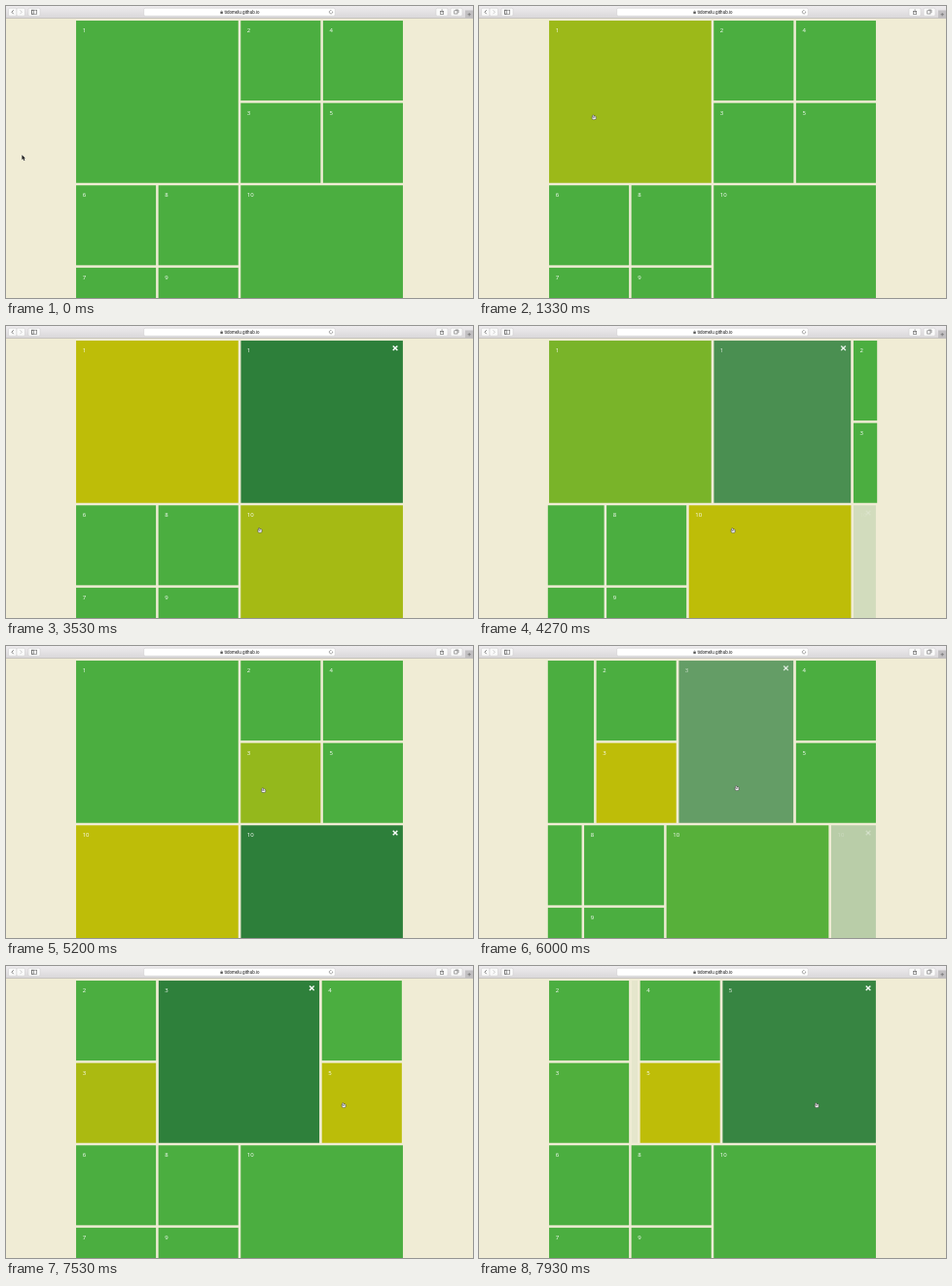
Write an HTML page with a canvas that moves like this. It is 480 px wide and 300 px high and loops after 8 s.

```html
<!DOCTYPE html>
<html lang="en">
<head>
<meta charset="utf-8">
<title>Expanding tiles</title>
<style>
html, body { margin: 0; width: 100%; height: 100%; overflow: hidden; background: #f0ecd5; }
canvas { display: block; width: 480px; height: 300px; }
</style>
</head>
<body>
<canvas id="stage" width="480" height="300"></canvas>
<script>
const ctx = document.getElementById('stage').getContext('2d');
const LOOP = 8000, SLIDE = 500;
const LEFT = 70.8, TOP = 13.8, CELL = 84.6, GAP = 1.25, BIG = CELL * 2;
const PAGE = '#f0ecd5', DARK = '#2d7f3a';
const GREEN = [75, 174, 64], YELLOW = [190, 189, 8];

// Tile number: hover start, panel open, panel close
const active = {
  1: [1160, 2003, 4144],
  10: [3320, 4144, 5681],
  3: [5060, 5681, 7505],
  5: [7015, 7505, 1e5]
};

// Pointer stops: time, x, y
const stops = [
  [0, 17, 153], [850, 17, 153], [1500, 137, 107], [2850, 137, 107],
  [3550, 261, 210], [4920, 261, 210], [5210, 264.5, 148], [5600, 265, 146],
  [6650, 265, 146], [7200, 347, 143], [LOOP, 347, 143]
];

const clamp = v => Math.max(0, Math.min(1, v));
const swing = v => 0.5 - Math.cos(Math.PI * clamp(v)) / 2;
const settle = ms => ms > 0 ? 1 - Math.exp(-ms / 140) : 0;

function openness(n, t) {
  const [, open, close] = active[n];
  return swing((t - open) / SLIDE) - swing((t - close) / SLIDE);
}

function tileColor(n, t) {
  const a = active[n];
  const k = a ? settle(t - a[0]) * (1 - settle(t - a[2])) : 0;
  return `rgb(${GREEN.map((g, i) => Math.round(g + (YELLOW[i] - g) * k))})`;
}

function line(points, color, width) {
  ctx.beginPath();
  points.forEach(([x, y]) => ctx.lineTo(x, y));
  ctx.strokeStyle = color;
  ctx.lineWidth = width;
  ctx.stroke();
}

function roundBox(x, y, w, h, r, fill, stroke) {
  ctx.beginPath();
  ctx.roundRect(x, y, w, h, r);
  ctx.fillStyle = fill;
  ctx.fill();
  if (stroke) {
    ctx.strokeStyle = stroke;
    ctx.lineWidth = 0.5;
    ctx.stroke();
  }
}

function label(n, x, y) {
  ctx.fillStyle = '#fff';
  ctx.font = '6px "Open Sans", sans-serif';
  ctx.textAlign = 'left';
  ctx.fillText(n, x + 6.6, y + 12.1);
}

function tile(n, x, y, w, h, color) {
  ctx.fillStyle = color;
  ctx.fillRect(x + GAP, y + GAP, w - 2 * GAP, h - 2 * GAP);
  label(n, x + GAP, y + GAP);
}

function panel(n, x, y, p, t) {
  const w = BIG * p;
  if (w <= 2 * GAP) return;
  ctx.save();
  ctx.globalAlpha = p;
  ctx.beginPath();
  ctx.rect(x + GAP, y, w - 2 * GAP, BIG);
  ctx.clip();
  tile(n, x, y, w, BIG, DARK);
  // The first panel gets its close button once it is fully open
  if (n === 1) ctx.globalAlpha = p * clamp((t - 2500) / 90);
  const cx = x + w - GAP - 7.9, cy = y + GAP + 7.7, r = 2.3;
  line([[cx - r, cy - r], [cx + r, cy + r]], '#fff', 1.4);
  line([[cx + r, cy - r], [cx - r, cy + r]], '#fff', 1.4);
  ctx.restore();
}

// Columns hold one big tile or a stack of two; a panel may follow each
function row(y, scroll, columns, t) {
  ctx.save();
  ctx.beginPath();
  ctx.rect(LEFT, y, CELL * 4, BIG);
  ctx.clip();
  let x = LEFT - scroll;
  for (const col of columns) {
    const size = BIG / col.length;
    col.forEach((n, i) => tile(n, x, y + i * size, size, size, tileColor(n, t)));
    x += size;
    for (const n of col.filter(k => active[k])) {
      const p = openness(n, t);
      panel(n, x, y, p, t);
      x += BIG * p;
    }
  }
  ctx.restore();
}

function toolbar() {
  const g = ctx.createLinearGradient(0, 0, 0, 12.5);
  g.addColorStop(0, '#eeecee');
  g.addColorStop(1, '#d9d7d9');
  ctx.fillStyle = g;
  ctx.fillRect(0, 0, 480, 12.5);
  ctx.fillStyle = '#bab8b5';
  ctx.fillRect(0, 12.3, 480, 0.7);

  const edge = '#cbc9cb', ink = '#666';
  for (const [x, w] of [[2.5, 8.5], [11, 8.5], [23, 12], [442, 12], [457, 12]])
    roundBox(x, 2.2, w, 8, 1.3, '#fafafa', edge);
  line([[7.7, 4.2], [5.9, 6.2], [7.7, 8.2]], ink, 0.8);
  line([[14.5, 4.2], [16.3, 6.2], [14.5, 8.2]], '#bbb', 0.7);
  ctx.strokeStyle = ink;
  ctx.lineWidth = 0.6;
  ctx.strokeRect(26.5, 4.2, 5.2, 4);
  ctx.strokeRect(26.5, 4.2, 1.8, 4);
  ctx.strokeRect(446.5, 5.3, 3.2, 3.3);
  line([[448.1, 7], [448.1, 3.3]], ink, 0.6);
  ctx.strokeRect(460.8, 4.8, 3.2, 3.2);
  line([[462, 4], [465, 4], [465, 7]], ink, 0.6);

  roundBox(141.7, 2.2, 196.5, 8, 1.4, '#fff', edge);
  ctx.fillStyle = '#555';
  ctx.fillRect(220.4, 5.9, 2.4, 2);
  ctx.beginPath();
  ctx.arc(221.6, 5.8, 0.8, Math.PI, 0);
  ctx.strokeStyle = '#555';
  ctx.lineWidth = 0.5;
  ctx.stroke();
  ctx.fillStyle = '#222';
  ctx.font = '500 4.2px Inter, sans-serif';
  ctx.textAlign = 'center';
  ctx.fillText('tidomelu.github.io', 242.5, 7.8);
  ctx.beginPath();
  ctx.arc(334, 6.2, 1.7, -0.4, 5);
  ctx.strokeStyle = ink;
  ctx.lineWidth = 0.6;
  ctx.stroke();

  ctx.fillStyle = '#c2c0c2';
  ctx.fillRect(472, 4.5, 8, 8);
  line([[474.5, 8.7], [477.9, 8.7]], ink, 0.6);
  line([[476.2, 7], [476.2, 10.4]], ink, 0.6);
}

function pointer(t) {
  const i = stops.findIndex(s => s[0] > t);
  const [t0, x0, y0] = stops[i - 1], [t1, x1, y1] = stops[i];
  const k = swing((t - t0) / (t1 - t0));
  ctx.save();
  ctx.translate(x0 + (x1 - x0) * k, y0 + (y1 - y0) * k);
  if (t < active[1][0]) {
    ctx.beginPath();
    [[-0.6, 0], [-0.6, 5], [0.6, 4], [1.5, 5.9], [2.4, 5.4], [1.5, 3.6], [3, 3.5]]
      .forEach(([x, y]) => ctx.lineTo(x, y));
    ctx.closePath();
    ctx.fillStyle = '#222';
    ctx.strokeStyle = '#fff';
    ctx.lineWidth = 0.5;
    ctx.stroke();
    ctx.fill();
  } else {
    roundBox(-1.9, -1.3, 4.2, 3.7, 1.3, '#fff', '#333');
    roundBox(-1.3, -2.4, 1.3, 3, 0.6, '#fff', '#333');
    line([[0.2, -0.4], [0.2, 1]], '#555', 0.4);
    line([[1.3, -0.2], [1.3, 1]], '#555', 0.4);
  }
  ctx.restore();
}

function draw(t) {
  ctx.fillStyle = PAGE;
  ctx.fillRect(0, 0, 480, 300);
  const shift = swing((t - active[3][1]) / SLIDE) * BIG;
  row(TOP, shift, [[1], [2, 3], [4, 5]], t);
  row(TOP + BIG, openness(10, t) * BIG, [[6, 7], [8, 9], [10]], t);
  toolbar();
  pointer(t);
}

const start = performance.now();
function tick() {
  draw((performance.now() - start) % LOOP);
  requestAnimationFrame(tick);
}
tick();
</script>
</body>
</html>
```
